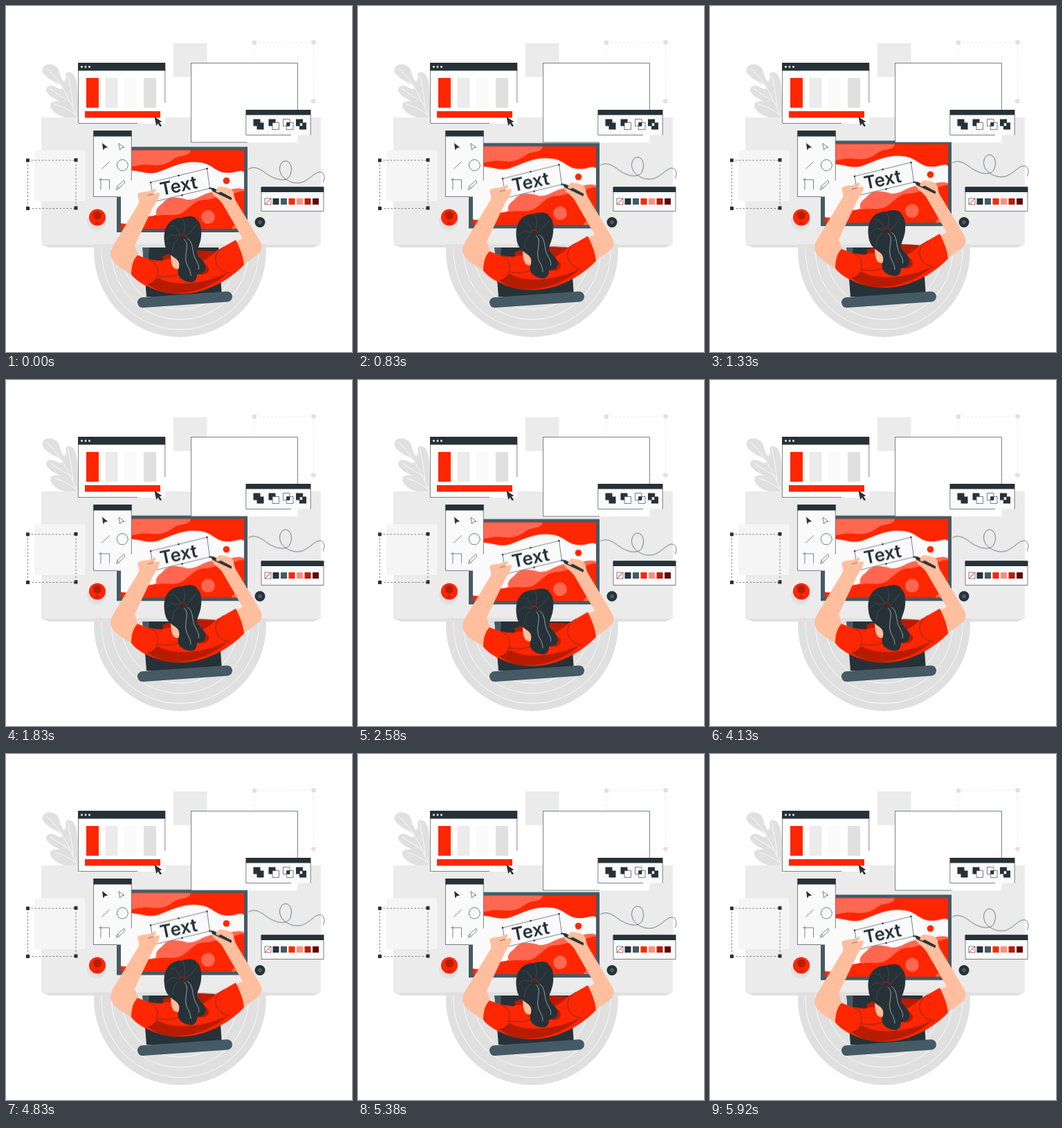
An HTML page for the animation above (5960 ms loop, 500 px wide and 500 px high).

```html
<!DOCTYPE html>
<html lang="en">
<head>
<meta charset="utf-8">
<title>Designer at a desk</title>
<style>
html, body { margin: 0; width: 100%; height: 100%; overflow: hidden; background: #fff; }
svg { display: block; width: 100vw; height: 100vh; }
.float { animation: float 2.98s linear infinite; }
@keyframes float { 50% { transform: translateY(-10px); } }
.red { fill: #ff2602; }
.deep { fill: #b81c00; }
.salmon { fill: #ff6750; }
.dark { fill: #263238; }
.slate { fill: #455a64; }
.skin { fill: #ffbe9d; }
.paper { fill: #fafafa; }
.mist { fill: #ebebeb; }
.grey { fill: #e0e0e0; }
.line { fill: none; stroke: #263238; stroke-width: .6; }
.panel { fill: #fafafa; stroke: #263238; stroke-width: .6; }
.white { fill: #fff; }
.vein { fill: none; stroke: #fff; stroke-width: .8; }
.label { font: 600 26px Inter, "Open Sans", sans-serif; fill: #263238; }
</style>
</head>
<body>
<svg viewBox="0 0 500 500">
  <defs>
    <clipPath id="screen"><path d="M166 208.500H344V322H166Z"/></clipPath>
  </defs>

  <!-- rug -->
  <circle class="grey" cx="251.5" cy="354" r="124.500"/>
  <g class="vein">
    <circle cx="251.5" cy="354" r="113.500"/>
    <circle cx="251.5" cy="354" r="99"/>
    <circle cx="251.5" cy="354" r="84"/>
  </g>

  <!-- plant -->
  <path class="grey" d="M53 91C54 83 66 82 73 88C79 94 78 103 82 108C86 112 88 105 86 100C86 94 95 94 99 101C104 112 104 125 104 162H92C78 161 64 152 64 143C64 138 71 137 78 138C72 135 60 130 58 122C58 115 66 113 73 118C78 121 83 121 80 116C75 111 67 109 61 104C56 100 52 97 53 91Z"/>
  <path class="vein" d="M59 90C80 110 92 135 103 161M89 98C92 110 94 122 97 145M64 120C74 128 84 132 93 139M70 142C82 145 92 151 101 157"/>

  <!-- desk and chair seat -->
  <path class="mist" d="M242 54H290.500V102.500H242Z"/>
  <path class="dark" d="M197 345H307L312 420H203Z"/>
  <path class="slate" d="M197 345H207L205 384L201 390Z"/>
  <path class="mist" d="M51 161H455V344.500H51Z"/>
  <path class="grey" d="M51 344.500H455L444 349H62Z"/>

  <!-- selection frames -->
  <path d="M41 208.500H114V282H41Z" fill="#f5f5f5"/>
  <path class="line" stroke-dasharray="2.5 2.5" d="M31.500 223H101V292.500H31.500Z"/>
  <path class="dark" d="M29 220.500h5v5h-5zM98.500 220h5v5h-5zM29 290h5v5h-5zM98.500 289.500h5v5h-5z"/>
  <path fill="none" stroke="#ebebeb" stroke-dasharray="3 3" d="M359 52.500H444.500V137.500H359Z"/>
  <path class="grey" d="M356 50h6v6h-6zM441.500 49.500h6v6h-6zM441.500 134.500h6v6h-6z"/>

  <!-- desk objects -->
  <circle class="grey" cx="131" cy="311" r="13.500"/>
  <circle class="red" cx="132" cy="305.500" r="12"/>
  <circle class="deep" cx="132" cy="302.500" r="6"/>
  <path class="deep" d="M129.500 312.500h5v2h-5z"/>
  <circle class="dark" cx="367" cy="312.500" r="7.500"/>
  <circle class="slate" cx="367" cy="312.500" r="3"/>

  <!-- monitor and loose curve -->
  <g class="float">
    <path class="line" d="M350 236C357 231 366 234 376 242C388 251 404 255 410 246C415 236 412 224 404 224C396 224 393 236 398 244C404 253 418 259 430 254C442 248 447 239 455 240C461 242 461 250 458 255"/>
    <path class="slate" d="M160 203.500H349V327H160Z"/>
    <g clip-path="url(#screen)">
      <path class="red" d="M166 208H344V322H166Z"/>
      <path class="salmon" d="M166 208H267C266 218 252 215 244 220C234 227 228 231 212 230C198 228 190 230 166 236Z"/>
      <path class="paper" d="M166 240C186 232 200 246 220 240C240 232 258 223 280 226C298 228 302 240 318 241C332 242 338 235 344 240V268C320 275 290 282 262 283C236 286 228 304 204 304C190 306 184 318 166 314Z"/>
      <path class="salmon" d="M344 265C330 260 320 270 304 269C288 267 278 281 262 280C246 275 234 276 228 283C222 290 214 292 218 304L344 300Z"/>
      <path class="red" d="M166 315C184 320 195 309 215 304C232 299 244 306 256 298C268 290 272 281 286 280C302 280 312 271 322 272C332 272 338 266 344 268V322H166Z"/>
      <path class="salmon" d="M326 322C328 314 338 317 344 309V322Z"/>
      <circle class="salmon" cx="292" cy="305" r="10"/>
      <circle class="red" cx="318.500" cy="252.500" r="4.800"/>
    </g>
    <g transform="translate(0 2)">
      <path class="panel" d="M209 253L290.500 233L294.500 261.500L213.500 281Z"/>
      <g class="dark">
        <circle cx="209" cy="253" r="1.300"/><circle cx="249.500" cy="243" r="1.300"/>
        <circle cx="290.500" cy="233" r="1.300"/><circle cx="294.500" cy="261.500" r="1.300"/>
        <circle cx="254.500" cy="271.500" r="1.300"/>
      </g>
      <text class="label" transform="translate(224.500 272) rotate(-11.500)">Text</text>
    </g>
  </g>

  <!-- layout window -->
  <path class="white" d="M104.500 82.500H230V170H104.500Z"/>
  <path class="line" d="M104.500 93V169.500H190M229.800 93V140"/>
  <path class="dark" d="M104 82H230.300V93.500H104Z"/>
  <g class="white">
    <circle cx="109.500" cy="88" r="1.400"/><circle cx="115" cy="88" r="1.400"/><circle cx="120.500" cy="88" r="1.400"/>
  </g>
  <path class="red" d="M116 104h18v43h-18zM114 152h109v9.500h-109z"/>
  <path class="mist" d="M143.500 104h18v43h-18z"/>
  <path class="paper" d="M170.500 104h18v43h-18z"/>
  <path class="grey" d="M199 104h18v43h-18z"/>
  <path class="dark" d="M214.500 160L217.200 173L219.700 169.800L222.800 174.500L225 173L221.900 168.400L225.300 167.300Z"/>

  <!-- canvas and shape window -->
  <path class="white" d="M267.500 82.500H421.500V197.300H267.500Z"/>
  <path class="line" d="M349 197H267.500V82.500H421.500V150"/>
  <path class="paper" d="M346.800 150.500H440.200V186.500H346.800Z"/>
  <path class="line" d="M346.800 157V186.500H412M440.200 157V186.500"/>
  <path class="dark" d="M346.500 150H440.500V157.500H346.500Z"/>
  <path class="dark" d="M357.500 163.500h10v5h5v10h-10v-5h-5zM379.500 163.500h10v10h-10zM405.500 168.500h4.500v5h-4.500zM419 163.500h10v10h-10zM424 168.500h10v10h-10z"/>
  <path class="panel" d="M385 168.500h9.500v10h-9.500zM424.500 169h4v4.500h-4z"/>
  <path class="line" d="M400.500 163.500h9.500v10h-9.500zM405.500 168.500h9.500v10h-9.500z"/>

  <!-- tool window -->
  <path class="paper" d="M126.500 180.500H181.500V275.500H126.500Z"/>
  <path class="line" d="M160 275.500H126.500V188M181.300 188V252"/>
  <path class="dark" d="M126.200 180H181.800V188.500H126.200Z"/>
  <path class="dark" d="M139 198L140.500 208.500L143 205L147.300 204.500Z"/>
  <path class="line" d="M163 198.500L164.500 208L167 205L171 204.500ZM138.500 235.500L149.500 225M134 251H149.500V265M137 248.500V265.500M159.500 265.500L161 260.500L169.500 252.500Q172 252 171.800 255L163.500 263.500ZM161 260.500L163.500 263.500"/>
  <circle class="line" cx="168.300" cy="230" r="8"/>

  <!-- swatch window -->
  <path class="panel" d="M369 262H459V296.500H369Z"/>
  <path class="dark" d="M368.700 261.300H459.300V269H368.700Z"/>
  <path class="panel" d="M374 278h9v9h-9z"/>
  <path d="M374 287l9-9" stroke="#ff2602"/>
  <path class="dark" d="M385.500 278h9v9h-9z"/>
  <path class="slate" d="M397 278h9v9h-9z"/>
  <path class="red" d="M408.500 278h9v9h-9z"/>
  <path fill="#ff8f7f" d="M420 278h9v9h-9z"/>
  <path class="deep" d="M431.500 278h9v9h-9z"/>
  <path fill="#5a0b00" d="M443 278h9v9h-9z"/>

  <!-- designer -->
  <g class="float">
    <path class="skin" d="M151 359C151 351 156 345 160 338L192 285C194 279 187 272 193 270C200 267 206 270 215 264C219 265 214 270 213 272C220 268 224 270 221 275C219 282 213 288 210 296L186 346L191 361L181 388C168 380 152 371 151 359Z"/>
    <path class="line" d="M205 274C209 272 212 272 213 272"/>
    <path class="skin" d="M305 264C309 258 313 262 317 262C324 263 328 266 329 271C330 276 331 280 333 283L366 338C371 346 371 353 364 359L343 374L331 341L342 336L313 286C308 278 296 272 297 267Z"/>
    <path class="dark" d="M294.500 262.500L300 263L325 276.200Q327.500 278.500 325 280.300L299 268Z"/>
    <path class="skin" d="M305 264C309 260 313 264 311 267C309 271 305 270 303 268Z"/>

    <path class="deep" d="M226 362C242 353 288 351 310 356L303 376H230Z"/>
    <path class="red" d="M190 360C202 365 214 368 224 368C236 364 240 366 246 372L276 371C286 369 296 362 304 354L332 338C338 350 343 362 344 374C330 389 310 402 290 409C270 417 245 418 225 413C208 408 190 400 181 388C181 376 184 366 190 360Z"/>
    <path class="deep" d="M204 401C213 402 215 394 220 393C242 405 280 404 320 386C300 405 268 417 238 415C224 414 212 408 204 401Z"/>
    <path class="deep" d="M276 374C286 370 294 374 293 382C291 388 284 389 278 388Z"/>
    <path class="line" d="M206 366C215 369 220 376 219 385C219 392 214 400 207 403M315 348C304 354 300 364 305 374C309 382 316 385 324 386M219 390C231 392 240 391 249 388"/>

    <path class="skin" d="M238 356C238 366 239 374 242 378C247 382 253 381 256 374L254 356Z"/>
    <path class="dark" d="M229 341C226 318 238 306 254 306C262 303 274 303 276 309C282 314 283 324 282 333C281 346 274 352 277 360C283 368 291 372 288 381C286 388 279 386 276 388C276 396 271 400 266 399C256 398 246 391 249 381C252 373 250 368 244 364C236 359 230 353 229 341Z"/>
    <path d="M249.500 334C250 328 260 328 260 335" fill="none" stroke="#b81c00" stroke-width="1.200"/>
    <path d="M257 337C266 344 258 355 260 368C261 376 267 380 267 390M262 336C272 342 268 356 274 366C277 372 280 376 278 381" fill="none" stroke="#ebebeb" stroke-width=".6"/>
    <path d="M248 333C241 328 236 332 231 338M251 329C247 319 241 316 238 318M257 328C260 318 258 312 255 307M261 331C270 325 272 318 276 316M249 337C243 340 240 349 241 356" fill="none" stroke="#52636b" stroke-width=".5"/>
  </g>

  <!-- chair back -->
  <path d="M197.500 428.500L319.500 420" fill="none" stroke="#455a64" stroke-width="15" stroke-linecap="round"/>
</svg>
</body>
</html>
```
